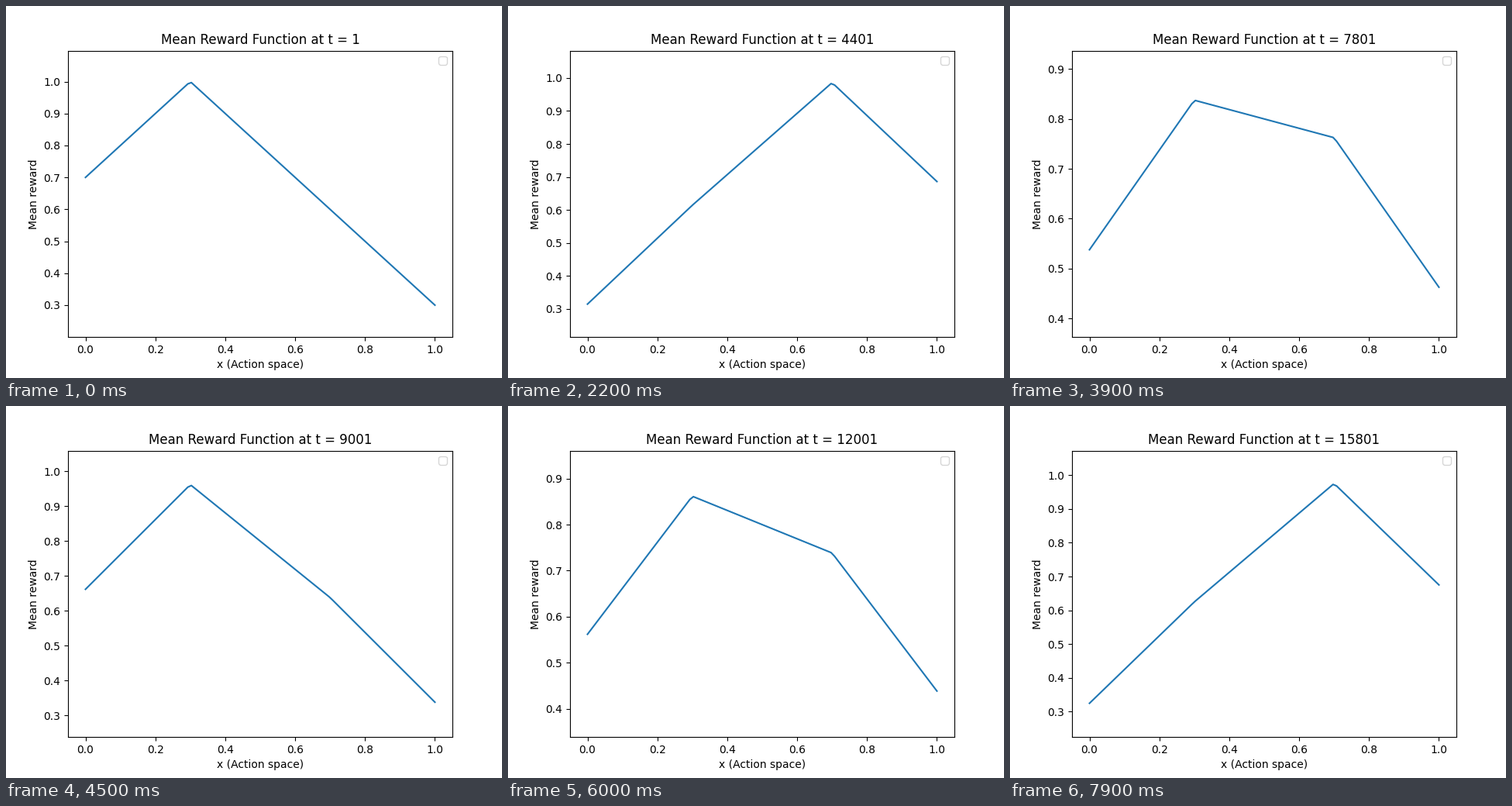
Recreate the animation shown at these times as a matplotlib script. Size 640x480 px, loop 8000 ms.

```python
import numpy as np
import matplotlib.pyplot as plt
from matplotlib.animation import FuncAnimation

FRAMES = 80
INTERVAL = 100   # ms
STEP = 200       # time steps per frame
PERIOD = 10000   # time steps per full swing between the peaks
PEAKS = 0.3, 0.7
PAD = 0.1

x = np.linspace(0, 1, 100)


def mean_reward(t):
    """Blend of two tent functions whose weights oscillate with t."""
    w = (1 + np.cos(2 * np.pi * t / PERIOD)) / 2
    left, right = (1 - np.abs(x - p) for p in PEAKS)
    return w * left + (1 - w) * right


fig, ax = plt.subplots(figsize=(6.4, 4.8), dpi=100)
line, = ax.plot(x, mean_reward(1), color="#1f77b4", lw=1.5)
ax.set_xlabel("x (Action space)")
ax.set_ylabel("Mean reward")
ax.legend([], [], loc="upper right")
title = ax.set_title("")


def update(i):
    t = 1 + STEP * i
    y = mean_reward(t)
    line.set_ydata(y)
    ax.set_ylim(y.min() - PAD, y.max() + PAD)
    title.set_text(f"Mean Reward Function at t = {t}")
    return line, title


anim = FuncAnimation(fig, update, frames=FRAMES, interval=INTERVAL,
                     repeat=True, repeat_delay=0, blit=False)
plt.show()
```
